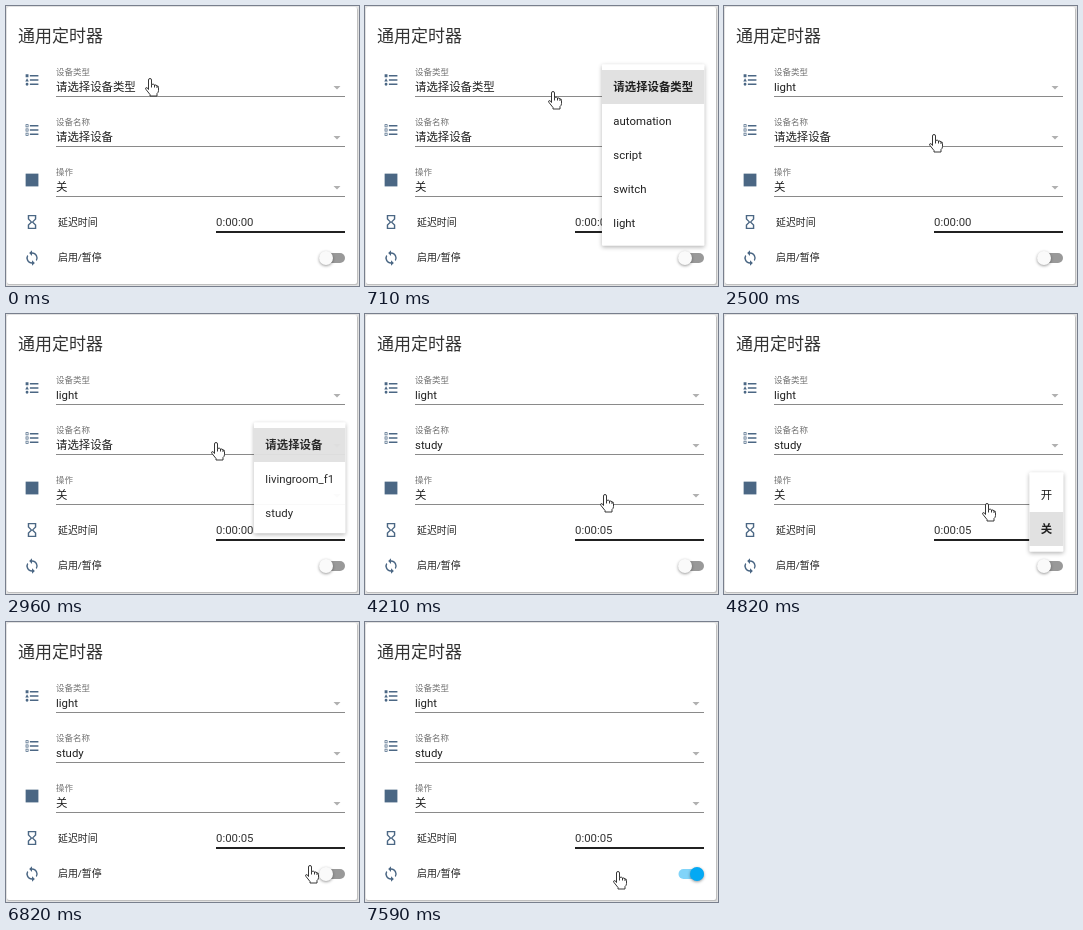
Write an HTML page with a canvas that moves like this. It is 353 px wide and 280 px high and loops after 7.99 s.

```html
<!DOCTYPE html>
<html lang="zh">
<head>
<meta charset="utf-8">
<style>
html, body { margin: 0; width: 100%; height: 100%; overflow: hidden; background: #e2e2e2 }
canvas { display: block }
</style>
</head>
<body>
<canvas id="stage" width="353" height="280"></canvas>
<script>
const canvas = document.getElementById('stage');
const screen2d = canvas.getContext('2d');
const layer = canvas.cloneNode().getContext('2d');
let ctx = screen2d;

const LOOP = 7990, RIGHT = 339.5, ROW = 34, SIZE = 11.4;
const INK = '#212121', ICON = '#4b6784', BLUE = '#03a9f4';
const TIMER_SET = 3960, SWITCHED = 7060;
const FONT = 'Roboto, "Noto Sans CJK SC", "Noto Sans CJK", sans-serif';
const clamp = v => Math.min(1, Math.max(0, v));
const fieldY = i => 81 + 50 * i;

const fields = [
  { label: '设备类型', items: ['请选择设备类型', 'automation', 'script', 'switch', 'light'],
    from: 0, to: 4, click: 330, pick: 1825 },
  { label: '设备名称', items: ['请选择设备', 'livingroom_f1', 'study'],
    from: 0, to: 2, click: 2650, pick: 3720 },
  { label: '操作', items: ['开', '关'], from: 1, to: 1, click: 4400, pick: 5912 }
];

// Where the pointer heads next: start time, x, y
const GLIDE = 550;
const moves = [
  [0, 144, 73], [490, 254, 154], [1160, 259, 217], [1930, 210, 129],
  [2960, 271, 192], [3880, 240, 181], [4210, 251, 190], [4750, 314, 196],
  [5120, 316, 176], [5350, 319, 210], [6060, 253, 236], [6400, 320, 250],
  [7040, 253, 250]
];

const hand = new Path2D('M-1 11V1.5Q-1 0 .5 0T2 1.5V6Q4 5 5 6.5Q7 6 7.5 7.5Q9 7 9 9V12Q9 14 7.5 15V17.5H.5V16L-3.5 11Q-4.5 9 -3 9Q-2 9 -1 11ZM2 6V9M5 6.5V9M7.5 7.5V9.5');
const arrow = new Path2D('M0 0V13L3 10.2L5 15L7 14.2L5 9.5H9Z');

const bars = [5, 11, 17].map(y => `M9 ${y}h12v2h-12Z`).join('');
const boxes = [4, 10, 16].map(y => `M3 ${y}h4v4h-4ZM4 ${y + 1}v2h2v-2Z`).join('');
const icons = [
  [74, bars + 'M5 9.5L7.5 14H2.5ZM3 4H7V8H3ZM5 20A2 2 0 0 0 5 16A2 2 0 0 0 5 20Z'],
  [124, bars + boxes],
  [174, 'M3 3H21V21H3Z'],
  [216, 'M6 2V8L10 12L6 16V22H18V16L14 12L18 8V2ZM16 16.5V20H8V16.5L12 12.5ZM12 11.5L8 7.5V4H16V7.5Z'],
  [252, 'M12 18A6 6 0 0 1 6.7 9.2L5.2 7.7A8 8 0 0 0 12 20V23L16 19L12 15ZM12 4V1L8 5L12 9V6A6 6 0 0 1 17.3 14.8L18.8 16.3A8 8 0 0 0 12 4Z']
].map(([y, d]) => [y, new Path2D(d)]);

function pointerAt(t) {
  let [, x, y] = moves[0];
  moves.forEach(([start, toX, toY], i) => {
    if (t < start) return;
    const next = moves[i + 1]?.[0] ?? LOOP;
    const k = clamp((t - start) / Math.min(GLIDE, next - start));
    x += (toX - x) * k;
    y += (toY - y) * k * k;
  });
  return [Math.round(x), Math.round(y)];
}

function rect(x, y, w, h, color, r = 0) {
  ctx.fillStyle = color;
  ctx.beginPath();
  ctx.roundRect(x, y, w, h, r);
  ctx.fill();
}

function disc(x, y, r, color) {
  ctx.fillStyle = color;
  ctx.beginPath();
  ctx.arc(x, y, r, 0, 7);
  ctx.fill();
}

// y is the vertical middle of the glyphs
function text(s, x, y, size = SIZE, color = INK, weight = 400) {
  ctx.font = `${weight} ${size}px ${FONT}`;
  ctx.fillStyle = color;
  ctx.fillText(s, x, y + size * .37);
}

function shadow(blur, dy, alpha) {
  ctx.shadowColor = `rgba(0,0,0,${alpha})`;
  ctx.shadowBlur = blur;
  ctx.shadowOffsetY = dy;
}

function drawField({ label, items, from, to, click, pick }, y, t) {
  text(label, 50, y - 15, 8.5, '#737373');
  text(items[t < pick + 100 ? from : to], 50, y);
  rect(50, y + 9, 289, 1, '#8a8a8a');
  ctx.fillStyle = '#b0b0b0';
  ctx.fill(new Path2D(`M327.5 ${y - 1}h7l-3.5 3.5Z`));

  const k = (t - click) / 300;
  if (k < 0 || k >= 1) return;
  ctx.save();
  ctx.beginPath();
  ctx.rect(50, y - 18, 289, 28);
  ctx.clip();
  disc(...pointerAt(click), 30 + 150 * k, `rgba(0,0,0,${.08 * (1 - k)})`);
  ctx.restore();
}

// Painted opaque on its own layer, then blended as one sheet
function drawMenu({ items, from, to, click, pick }, y, t) {
  const grow = clamp((t - click - 120) / 200), fade = clamp((t - pick) / 150);
  if (!grow || fade === 1) return;
  ctx = layer;
  ctx.clearRect(0, 0, 353, 280);
  ctx.save();
  ctx.font = `${SIZE}px ${FONT}`;
  const width = Math.max(...items.map(s => ctx.measureText(s).width)) + 2 * SIZE;
  const squeeze = .18 * Math.sqrt(fade);
  const x = RIGHT - width, top = y - 22.7 - 20 * squeeze;
  const height = (items.length * ROW + SIZE) * (.5 + grow / 2 - squeeze / 2);
  const chosen = fade ? to : from;
  shadow(4, 1.5, .3);
  rect(x, top, width, height, '#fff', 1);
  shadow(0, 0, 0);
  ctx.clip();
  items.forEach((item, i) => {
    const mid = top + 22.7 + i * ROW;
    if (i === chosen) rect(x, mid - ROW / 2, width, ROW, '#e1e1e1');
    text(item, x + SIZE, mid, SIZE, INK, i === chosen ? 700 : 400);
  });
  ctx.restore();
  ctx = screen2d;
  ctx.globalAlpha = grow * (1 - fade);
  ctx.drawImage(layer.canvas, 0, 0);
  ctx.globalAlpha = 1;
}

function drawToggle(t) {
  const on = t >= SWITCHED, x = on ? 332 : 320, k = (t - SWITCHED) / 500;
  rect(313.5, 247, 25.5, 10, on ? '#81d4f9' : '#999', 5);
  if (on && k < 1) disc(x, 252, 8 + 9 * clamp(k * 2), `rgba(3,169,244,${.25 * (1 - k)})`);
  shadow(3, 1, .4);
  disc(x, 252, 7, on ? BLUE : '#fafafa');
  shadow(0, 0, 0);
}

function drawPointer(t) {
  const [x, y] = pointerAt(t);
  const overMenu = fields.some(f => t > f.click && t < f.pick + 100);
  const shape = !overMenu && y > 195 && y < 240 ? arrow : hand;
  ctx.save();
  ctx.translate(x - .5, y - .5);
  ctx.fillStyle = '#fff';
  ctx.strokeStyle = '#222';
  ctx.lineWidth = .9;
  ctx.fill(shape);
  ctx.stroke(shape);
  ctx.restore();
}

function draw(t) {
  rect(0, 0, 353, 280, '#e2e2e2');
  rect(1, 2, 351, 277, '#c0c0c0', 2);
  rect(1, 1, 350, 277, '#fff', 2);
  text('通用定时器', 12, 29.5, 17, '#333');

  for (const [y, path] of icons) {
    ctx.save();
    ctx.translate(17.5, y - 8.5);
    ctx.scale(.71, .71);
    ctx.fillStyle = ICON;
    ctx.fill(path, 'evenodd');
    ctx.restore();
  }

  fields.forEach((f, i) => drawField(f, fieldY(i), t));
  text('延迟时间', 52, 216, 9.9);
  text(t < TIMER_SET ? '0:00:00' : '0:00:05', 210, 216, SIZE, '#333');
  rect(210, 225, 129, 2, INK);
  text('启用/暂停', 52, 251.5, 9.9);
  drawToggle(t);

  fields.forEach((f, i) => drawMenu(f, fieldY(i), t));
  drawPointer(t);
}

function tick() {
  draw(performance.now() % LOOP);
  requestAnimationFrame(tick);
}
tick();
</script>
</body>
</html>
```
